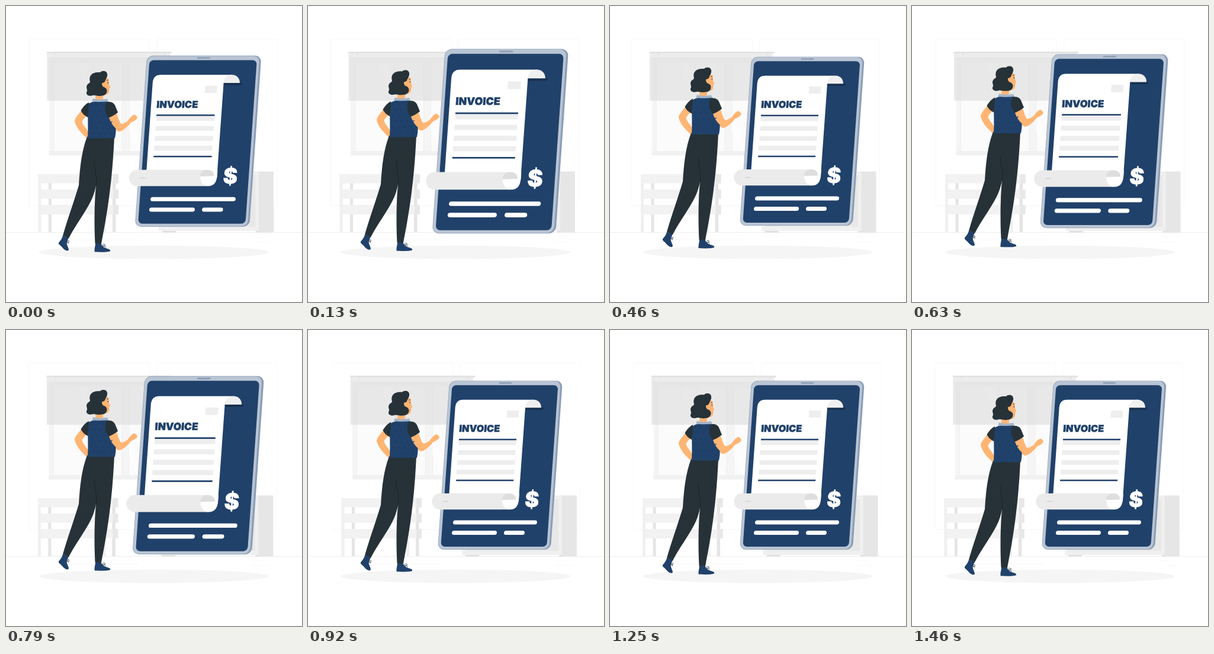
These frames come from a looping animation (500 by 500 pixels, 1.5 s). An HTML page:

```html
<!DOCTYPE html>
<html lang="en">
<head>
<meta charset="utf-8">
<title>Invoice</title>
<style>
html, body { margin: 0; width: 100%; height: 100%; overflow: hidden; background: #fff; }
svg { display: block; width: 100%; height: 100%; }
text { font-family: Inter, "Liberation Sans", sans-serif; font-weight: 900; stroke-width: .5; }
</style>
</head>
<body>
<svg viewBox="0 0 500 500">
  <g id="room">
    <g fill="none" stroke="#f8f8f8">
      <rect x="39" y="55.5" width="204" height="282" rx="2"/>
      <rect x="255" y="55.5" width="203" height="282" rx="2"/>
    </g>
    <path d="M0 382.5H500" stroke="#eeeeee"/>
    <path d="M416 398H447M418 390H434M108 395H225" stroke="#f8f8f8"/>

    <!-- window -->
    <rect x="73" y="80" width="204" height="172" fill="#f5f5f5"/>
    <rect x="73" y="245" width="204" height="7.5" fill="#f1f1f1"/>
    <path d="M81 96H196V245H81ZM208 96H268V245H208Z" fill="#fbfbfb"/>
    <path d="M80.5 96V245M147 96V245M196.5 96V245M208.5 96V245" stroke="#eeeeee"/>
    <path d="M122 96H134L190 245H172ZM208 180L236 245H222L208 212Z" fill="#fff" opacity=".6"/>
    <rect x="69.5" y="80" width="207" height="80" fill="#dcdcdc" opacity=".6"/>
    <rect x="69.5" y="80" width="207" height="7" fill="#ececec"/>
    <rect x="69" y="77.3" width="211" height="2.4" fill="#dedede"/>
    <path d="M84.5 79V83M269 79V83" stroke="#dedede" stroke-width="1.5"/>

    <!-- bench -->
    <path d="M72 290h5v92h-5ZM180 290h5.5v92h-5.5Z" fill="#e5e5e5"/>
    <path d="M54.5 284h5v98h-5ZM164 290h5v92h-5Z" fill="#f0f0f0"/>
    <path d="M54.5 284H190V299.5H54.5ZM59 310H190V325.5H59ZM59 336H190V352H59Z" fill="#f2f2f2"/>
    <path d="M181 284H190V299.5H181ZM181 310H190V325.5H181ZM181 336H190V352H181Z" fill="#e8e8e8"/>

    <!-- cabinet -->
    <rect x="258" y="279.5" width="170" height="100.5" fill="#f0f0f0"/>
    <path d="M264 286H421.5V373H264Z" fill="#e8e8e8"/>
    <rect x="427" y="279.5" width="25" height="103" fill="#e6e6e6"/>
    <path d="M264 380H287V382.5H264ZM422 380H427V382.5H422Z" fill="#e0e0e0"/>
  </g>

  <ellipse cx="249.5" cy="416" rx="194" ry="11.3" fill="#f5f5f5"/>

  <g id="phone">
    <g transform="matrix(1 0 -.07 1 15.96 0)">
      <rect x="229" y="85.7" width="191" height="285.3" rx="11" fill="#8b9db6"/>
      <rect x="229.6" y="86.3" width="187.4" height="284" rx="10.5" fill="#b9c5d4"/>
      <rect x="234" y="93.2" width="179" height="272.8" rx="7" fill="#20416a"/>
      <rect x="313" y="88.3" width="21.5" height="2.5" rx="1.2" fill="#8b9db6"/>
    </g>
    <path d="M366 131.3H398V130Q398 135 393 135H366Z" fill="#17304f"/>
    <path d="M382 117.8H262Q250 117.8 248.7 130.5L237.5 290H340C349 290 355 296 355.8 288L367 131.3Z" fill="#fff"/>
    <path d="M367 131.3C367.5 122.500 373 117.8 381 117.8C389 117.8 394 123.5 394 131.3Z" fill="#efefef"/>
    <path d="M223 276H340V303.300H223A13.650 13.650 0 0 1 223 276Z" fill="#ebebeb"/>
    <path d="M328 287H356C355 297 351 303.300 341 303.300C333 303.300 328 297 328 287Z" fill="#fff"/>
    <path d="M350 276H357L356 288H350Z" fill="#fff"/>
    <path d="M328 287C328 280 333 276 340 276C347 276 351.5 280 351 286.5Z" fill="#dedede"/>
    <path id="dash" d="M228 289.5H237" stroke="#bdbdbd" stroke-width=".8"/>
    <g transform="matrix(1 0 -.07 1 15.96 0)">
      <path id="bars" fill="#eeeeee"/>
      <rect x="330" y="136" width="20" height="12" fill="#eeeeee"/>
      <path d="M252 185H349M252 254H349" stroke="#20416a" stroke-width="2.5"/>
      <text x="251" y="172.5" font-size="16" letter-spacing=".2" fill="#20416a" stroke="#20416a">INVOICE</text>
      <text x="382.4" y="298.6" font-size="36" text-anchor="middle" fill="#fff" stroke="#fff">$</text>
      <g fill="#fff">
        <rect x="251.8" y="321.5" width="142" height="7" rx="3.5"/>
        <rect x="251" y="339" width="76" height="7" rx="3.5"/>
        <rect x="339" y="339" width="35" height="7" rx="3.5"/>
      </g>
    </g>
  </g>

  <g id="woman">
    <!-- shoes -->
    <g fill="#20416a">
      <path d="M96 388L106 392C104 396 102 399 103 403C104 407 107 411 105.5 413C103 415 98 412 95 408C92 404 88 403 89 400C92 396 95 393 96 388Z"/>
      <path d="M151 401L161 401.5C161 405 164 407 168 409C173 411 177 411 176 414.5C168 416.5 158 416 149.5 415.5C149 410 151 406 151 401Z"/>
    </g>
    <path d="M103 397q5 -1 3 2t-4 -1q6 2 3 4M162 405q3 -4 5 -2t-4 3q6 -1 5 2" fill="none" stroke="#263238" stroke-width=".8"/>

    <!-- arms -->
    <path d="M128 176C123 183 116 189 116 195C118 205 128 216 136 223L141 222L138 211C134 205 129 200 128.5 195C131 190 136 186 140 182Z" fill="#ffb573"/>
    <path d="M172 184C176 195 182 207 189 212C195 214 205 205 211 197C216 195 222 192 222 188C220 187 219 183 216 184C211 186 208 191 206 194C202 197 197 200 194 199C191 195 189 187 186 180Z" fill="#ffb573"/>

    <!-- legs -->
    <path d="M137 221C128 245 125 270 123 303C115 330 104 360 96 388L106 392.5C124 358 147 335 152 303C149 335 149 370 150.5 401.5L161 402C168 365 179 310 183 221Z" fill="#263238"/>
    <path d="M149 262C150 275 152 285 153 292L152 303" fill="none" stroke="#18222a" stroke-width=".9"/>

    <!-- torso -->
    <path d="M138 166C148 159.5 162 159.5 174 162L173.5 187C176 196 181 203 185.5 207C186 212 185 218 184 223.5H138C139 205 138 185 138 166Z" fill="#20416a"/>
    <path id="weave" fill="none" stroke="#1d3b62" stroke-width="1.4" stroke-linecap="round"/>
    <path d="M140 163C134 166 129 172 126.5 177C129 182 133 186 138.5 188.5Z" fill="#263238"/>
    <path d="M169 164C175 160 182 163 184.5 169L189 180C184 184 179 187 173.5 189C168 182 166 172 169 164Z" fill="#263238"/>

    <!-- head -->
    <path d="M151 147H164V157Q159 161 151 159Z" fill="#ffb573"/>
    <path d="M147 156.5C154 158.800 164 158.500 171 157L173 161.5C163 162.500 153 162.500 145 161.5Z" fill="#a4b5c9"/>
    <path d="M160 124C165 121 171 121 173.5 124L174 132L176.3 138L174 140L174 145C173 150 168 152 160 150Z" fill="#ffb573"/>
    <path d="M142 128C139 118 146 111 159 112.5C162 109 170 109 171 115C172 120 168 124 167 128C166 130 162 129 163 134C164 138 168 137 170 141C172 147 168 152 160 152C154 153 149 150 146 151.5C141 153 135 151 136 146C139 142 134 138 137 134C138 131 142 131 142 128Z" fill="#263238"/>
    <path d="M163 130C161 130 162 136 165 137L167 133Z" fill="#ffb573"/>
    <path d="M170 126.3Q171.5 124.8 173 125.5" fill="none" stroke="#263238" stroke-width=".9"/>
    <ellipse cx="172.3" cy="130" rx=".7" ry="1.1" fill="#263238"/>
    <path d="M172 142.5L174 142" stroke="#c9763f" stroke-width=".8"/>
  </g>
</svg>
<script>
const LOOP = 1500, FRAMES = 36, STEP = LOOP / FRAMES;
const CX = 319.7, CY = 228, PEAK = 1.095;
const el = id => document.getElementById(id);
const room = el('room'), phone = el('phone'), woman = el('woman'), dash = el('dash');

// [percent, value] stops, linear between
const pulse = [[0, 1], [10, PEAK], [30, 1], [40, 1], [50, PEAK], [60, 1], [100, 1]];
const shake = [[0, 0], [10, -1], [20, 2], [30, -4], [40, 4], [50, -4], [60, 4], [70, -4], [80, 2], [90, -1], [100, 0]];
const float = [[0, 0], [50, -10], [100, 0]];

function track(stops, p) {
  const i = stops.findIndex(s => s[0] > p);
  if (i < 0) return stops[stops.length - 1][1];
  const [a, u] = stops[i - 1], [b, v] = stops[i];
  return u + (v - u) * (p - a) / (b - a);
}

el('bars').setAttribute('d', [186.5, 203, 219.7, 236].map(y => `M252 ${y}H349v8H252Z`).join(''));

let marks = '';
for (let r = 0; r < 6; r++)
  for (let c = 0; c < 4; c++)
    marks += `M${143 + c * 10 + (r % 2) * 4} ${169 + r * 9.5}l2 -2`;
el('weave').setAttribute('d', marks);

// 24 pictures per second, each sampled mid-interval
function draw(ms) {
  const n = Math.min(FRAMES - 1, Math.floor((ms % LOOP + 5) / STEP));
  const p = (n + .5) / FRAMES * 100;
  const s = track(pulse, p);
  room.setAttribute('transform', `translate(${track(shake, p)} 0)`);
  woman.setAttribute('transform', `translate(0 ${track(float, p)})`);
  phone.setAttribute('transform', `translate(${CX} ${CY}) scale(${s}) translate(${-CX} ${-CY})`);
  dash.setAttribute('opacity', s < 1.05 ? 1 : 0);
}

const start = performance.now();
function tick() {
  draw(performance.now() - start);
  requestAnimationFrame(tick);
}
tick();
</script>
</body>
</html>
```
